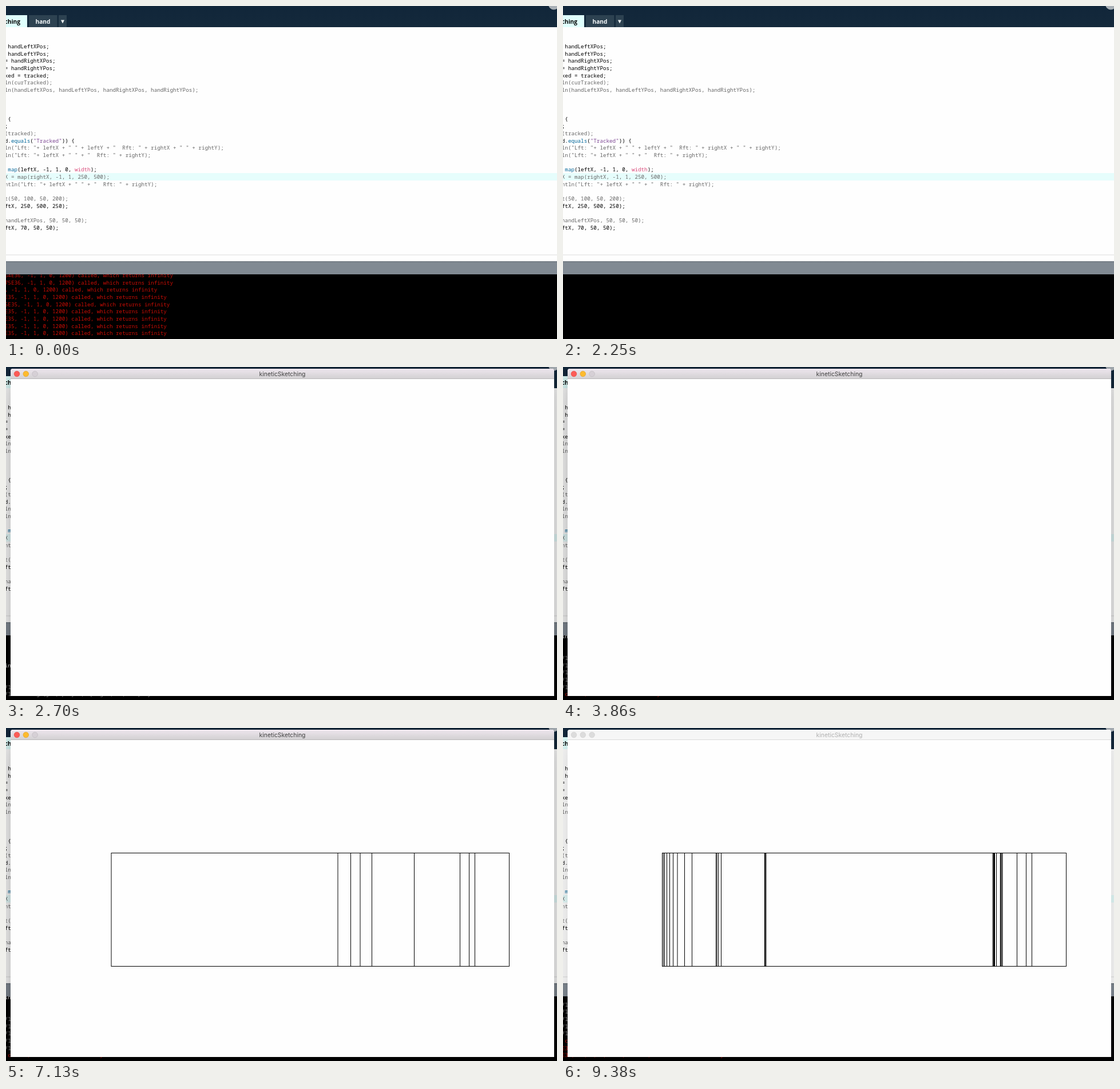
Write an HTML page with a canvas that moves like this. It is 963 px wide and 582 px high and loops after 9.5 s.

```html
<!DOCTYPE html>
<html lang="en">
<head>
<meta charset="utf-8">
<title>Sketch window</title>
<style>
  html, body { margin: 0; width: 100%; height: 100%; overflow: hidden; background: #000; }
  canvas { display: block; }
</style>
</head>
<body>
<canvas id="stage" width="963" height="582"></canvas>
<script>
const ctx = document.getElementById('stage').getContext('2d');
const W = 963, H = 582, LOOP = 9500;
const MONO = '9.25px "Noto Sans Mono", monospace';
const BOLD = 'bold 10.2px "Open Sans", sans-serif';
const TITLE = '10.4px Inter, sans-serif';
const CHAR = 5.55, LEFT = -2.2, ROW = 12.67;
const BLACK = '#000', GREY = '#666', BLUE = '#069', PURPLE = '#7d4793', PINK = '#d94a7a';
const RED = '#cc0d05', LOG = '#a8a8a8';

// Code by row number; a line is made of [colour, text] runs.
const code = {
  0: [[BLACK, ' handLeftXPos;']],
  1: [[BLACK, ' handLeftYPos;']],
  2: [[BLACK, '= handRightXPos;']],
  3: [[BLACK, '= handRightYPos;']],
  4: [[BLACK, 'ked = tracked;']],
  5: [[GREY, 'ln(curTracked);']],
  6: [[GREY, 'ln(handLeftXPos, handLeftYPos, handRightXPos, handRightYPos);']],
  10: [[BLACK, ' {']],
  11: [[BLACK, ';']],
  12: [[GREY, '(tracked);']],
  13: [[BLACK, 'd.'], [BLUE, 'equals'], [BLACK, '('], [PURPLE, '"Tracked"'], [BLACK, ')) {']],
  14: [[GREY, 'ln("Lft: "+ leftX + " " + leftY + "  Rft: " + rightX + " " + rightY);']],
  15: [[GREY, 'ln("Lft: "+ leftX + " " + "  Rft: " + rightY);']],
  17: [[BLUE, ' map'], [BLACK, '(leftX, -1, 1, 0, '], [PINK, 'width'], [BLACK, ');']],
  18: [[GREY, 'X = map(rightX, -1, 1, 250, 500);']],
  19: [[GREY, 'ntln("Lft: "+ leftX + " " + "  Rft: " + rightY);']],
  21: [[GREY, 't(50, 100, 50, 200);']],
  22: [[BLACK, 'ftX, 250, 500, 250);']],
  24: [[GREY, 'handLeftXPos, 50, 50, 50);']],
  25: [[BLACK, 'ftX, 70, 50, 50);']]
};

const warning = prefix => [RED, prefix + ', -1, 1, 0, 1200) called, which returns infinity'];
const oldLog = ['64E36', '75E36', '', 'E35', '5E35', 'E35', 'E35', 'E35', 'E35', 'E35'].map(warning);
const newLog = [
  ['#ddd', 'ing'], [LOG, ''], [LOG, ''],
  [LOG, '/16 loading'],
  [LOG, '/16 loading (jni) player, opengl (x86) display'],
  ...Array(3).fill([LOG, '/16 loading native library for the tracking device, then opening the color and depth streams']),
  [RED, ' called, which returns infinity'],
  warning('E35'), warning('E35')
];

// [time, left edges of the boxes drawn at that time]
const boxes = [
  [6290, 483.5], [6370, 423.5], [6460, 413.5, 397.5], [6540, 317.5],
  [6720, 243.5], [6820, 223], [6920, 206.5],
  [7130, 184], [7220, 176, 173.5], [7310, 175.5, 177.5], [7400, 181.5, 186.5],
  [7490, 192.5, 200], [7590, 212.5, 225.5], [7680, 267.5, 269],
  [7770, 271.5, 276.5, 372], [7860, 371, 369.3, 368.5], [8060, 368.3],
  [8240, 361.5], [8330, 358.5], [8470, 357.5], [8570, 356.5],
  [8680, 352.5], [8880, 353.5], [9180, 355]
];

function fill(color, x, y, w, h) {
  ctx.fillStyle = color;
  ctx.fillRect(x, y, w, h);
}

function label(text, x, y, font, color, align = 'left') {
  ctx.font = font;
  ctx.fillStyle = color;
  ctx.textAlign = align;
  ctx.fillText(text, x, y);
}

function disc(x, y, r, color, border) {
  ctx.beginPath();
  ctx.arc(x, y, r, 0, 2 * Math.PI);
  ctx.fillStyle = color;
  ctx.fill();
  if (!border) return;
  ctx.strokeStyle = border;
  ctx.lineWidth = 0.7;
  ctx.stroke();
}

function vertical(y0, y1, top, bottom) {
  const gradient = ctx.createLinearGradient(0, y0, 0, y1);
  gradient.addColorStop(0, top);
  gradient.addColorStop(1, bottom);
  return gradient;
}

function drawEditor(t) {
  fill('#fefefe', 0, 0, W, H);
  fill(vertical(0, 37, '#11263a', '#14293b'), 0, 0, W, 37);
  fill('#e0fffd', 0, 16, 37, 21);
  fill('#2d4251', 40, 16, 49.5, 21);
  fill('#2d4251', 92, 16, 14, 21);
  label('ching', 25, 30.5, BOLD, '#000', 'right');
  label('hand', 64.5, 30.5, BOLD, '#f4f8fa', 'center');
  ctx.beginPath();
  ctx.moveTo(96, 24.5);
  ctx.lineTo(102, 24.5);
  ctx.lineTo(99, 30.5);
  ctx.fillStyle = '#f4f8fa';
  ctx.fill();
  disc(957.5, -3, 9.5, '#a9b0b6');

  fill('#e6fdfc', 0, 292, W, 13);
  for (const [row, runs] of Object.entries(code)) {
    let x = LEFT;
    for (const [color, text] of runs) {
      label(text, x, 74 + row * ROW, MONO, color);
      x += text.length * CHAR;
    }
  }
  if ((t >= 1330 && t < 1510) || (t >= 1990 && t < 2250)) fill('#000', 102, 292, 1, 13);

  fill('#dedede', 0, 434.5, W, 1);
  fill('#818a93', 0, 446, W, 23);
  fill(vertical(445, 449, '#6c747c', '#818a93'), 0, 446, W, 3);
  fill('#000', 0, 469, W, H - 469);
}

function drawLog(lines, firstRow) {
  ctx.save();
  ctx.beginPath();
  ctx.rect(0, 469, W, H - 469);
  ctx.clip();
  lines.forEach(([color, text], i) => label(text, LEFT, 474 + (firstRow + i) * ROW, MONO, color));
  ctx.restore();
}

function drawConsole(t) {
  if (t < 890) drawLog(oldLog.slice(0, 9), 0);
  else if (t < 1330) drawLog(oldLog.slice(1), 0);
  else if (t >= 2700) {
    const firstRow = t < 3860 ? 4 : t < 8240 ? 0 : t < 9380 ? -1 : -2;
    const count = t < 3680 ? 5 : t < 3860 ? 6 : t < 8240 ? 9 : t < 9180 ? 10 : 11;
    drawLog(newLog.slice(0, count), firstRow);
  }
}

function drawWindow(t) {
  const active = t < 9380;
  ctx.save();
  ctx.beginPath();
  ctx.roundRect(8, 3, 950, 572, [4, 4, 0, 0]);
  ctx.shadowColor = `rgba(0, 0, 0, ${active ? 0.38 : 0.2})`;
  ctx.shadowBlur = 50;
  ctx.shadowOffsetY = 10;
  ctx.fillStyle = t < 2700 ? '#ececec' : '#fefefe';
  ctx.fill();
  ctx.shadowColor = 'transparent';
  ctx.clip();
  fill(active ? vertical(3, 20, '#eee6ee', '#d3d1d3') : '#f6f6f6', 8, 3, 950, 17);
  fill(active ? '#b9b7b9' : '#dadada', 8, 20, 950, 1);
  ctx.restore();

  const lights = active
    ? [['#fc5b57', '#e2463f'], ['#fdbb2e', '#e0a028'], ['#d6d0d6', '#c1bac1']]
    : Array(3).fill(['#dcdcdc', '#d0d0d0']);
  lights.forEach(([color, border], i) => disc(19 + 15.8 * i, 12, 4.8, color, border));
  label('kineticSketching', 483, 16, TITLE, active ? '#404040' : '#b0b0b0', 'center');
}

function drawBoxes(t) {
  ctx.strokeStyle = '#000';
  ctx.lineWidth = 1;
  for (const [time, ...edges] of boxes) {
    if (t < time) break;
    for (const x of edges) {
      fill('#fefefe', x, 218.5, 396, 198);
      ctx.strokeRect(x, 218.5, 396, 198);
    }
  }
}

function draw(now) {
  const t = now % LOOP;
  drawEditor(t);
  drawConsole(t);
  if (t >= 2610) {
    drawWindow(t);
    drawBoxes(t);
  }
}

const start = performance.now();
function tick() {
  draw(performance.now() - start);
  requestAnimationFrame(tick);
}
tick();
</script>
</body>
</html>
```
